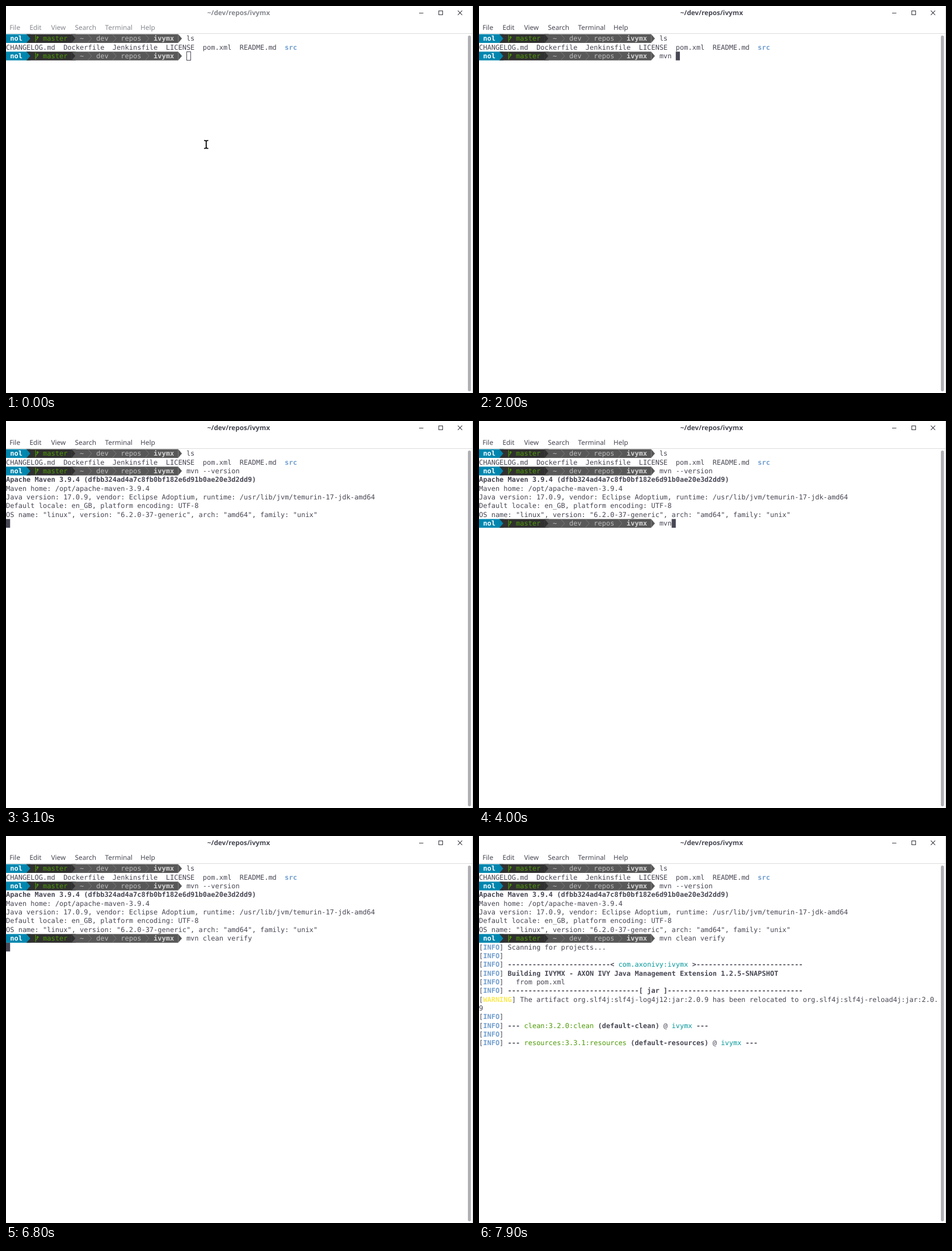
These frames come from a looping animation (823x681 px, 8 s). An HTML page:

```html
<!DOCTYPE html>
<html lang="en">
<head>
<meta charset="utf-8">
<title>Terminal</title>
<style>
  html, body { margin: 0; width: 100%; height: 100%; overflow: hidden; background: #fff; }
  svg { display: block; }
  text { white-space: pre; text-rendering: geometricPrecision; }
  #screen text { font: 12px "DejaVu Sans Mono", monospace; }
  #screen .bold { font-weight: bold; }
  #bar { font: 11.8px "Noto Sans", sans-serif; }
</style>
</head>
<body>
<svg id="stage" width="823" height="681" viewBox="0 0 823 681">
  <g id="bar">
    <text x="410" y="16.3" text-anchor="middle" font-weight="bold">~/dev/repos/ivymx</text>
  </g>
  <g fill="none" stroke="#3c3c46" stroke-width="1.1">
    <path d="M728 12.5h7.5M796.3 8.2l7.6 7.6m0-7.6l-7.6 7.6"/>
    <rect x="762.7" y="8.6" width="6.8" height="6.8"/>
  </g>
  <path d="M0 48.5h823" stroke="#dcdcdc"/>
  <path d="M822.5 0v681" stroke="#d2d2d4"/>
  <rect x="814" y="52" width="5.4" height="626" rx="2.7" fill="#b0b0b4"/>
  <g id="screen"></g>
  <rect id="cursor" stroke-width="1"/>
  <g id="pointer" fill="none" stroke-linecap="round">
    <path d="M349.8 236.6q3 0 3 1.6q0-1.6 3-1.6M352.8 238v11.4M349.8 250.6q3 0 3-1.6q0 1.6 3 1.6" stroke="#000" stroke-width="1.8"/>
  </g>
</svg>
<script>
const LOOP = 8000, CW = 7.2246, RH = 15.36, TOP = 49.6, BASE = 11.7, PROMPT = 44;
const INK = '#474754', BLUE = '#729fcf', GREEN = '#4e9a06', CYAN = '#06989a', YELLOW = '#fce94f';
const $ = id => document.getElementById(id);

function add(parent, tag, attrs, content = '') {
  const el = document.createElementNS('http://www.w3.org/2000/svg', tag);
  for (const k in attrs) el.setAttribute(k, attrs[k]);
  el.textContent = content;
  return parent.appendChild(el);
}

const label = (g, col, str, fill = INK, bold = false) =>
  add(g, 'text', { x: col * CW, y: BASE, fill, class: bold ? 'bold' : '' }, str);

const block = (g, from, to, fill) =>
  add(g, 'rect', { x: from * CW, y: 0, width: (to - from) * CW, height: RH, fill });

const arrow = (g, col, fill) =>
  add(g, 'path', { d: `M${col * CW} 0l6.6 ${RH / 2}l-6.6 ${RH / 2}z`, fill });

function prompt(g) {
  block(g, 0, 6, '#0087af');
  block(g, 5, 17, '#303030');
  block(g, 16, 42, '#585858');
  arrow(g, 5, '#0087af');
  arrow(g, 16, '#303030');
  arrow(g, 42, '#585858');
  for (const col of [20, 26, 34])
    add(g, 'path', { d: `M${col * CW} .6l6.4 ${RH / 2 - .6}l-6.4 ${RH / 2 - .6}`, fill: 'none', stroke: '#858585', 'stroke-width': .8 });
  add(g, 'path', { d: 'M52.2 1.5v12.5M52.4 10.5q3.4-1.4 3.4-5.5m-1.8 1.6l1.8-2.6l1.4 2.6', fill: 'none', stroke: GREEN, 'stroke-width': 1.2 });
  label(g, 1, 'nol', '#fff', true);
  label(g, 9, 'master', GREEN);
  label(g, 18, '~', '#bcbcbc');
  label(g, 22, 'dev', '#bcbcbc');
  label(g, 28, 'repos', '#bcbcbc');
  label(g, 36, 'ivymx', '#d4d4d4', true);
}

// A run is plain text or [text, colour, bold].
const b = str => [str, INK, true];
const info = (...runs) => ['[', ['INFO', BLUE, true], '] ', ...runs];
const goal = (name, id) => info(b('--- '), [name, GREEN], b(` (${id})`), ' @ ', ['ivymx', CYAN], b(' ---'));
const dash = n => '-'.repeat(n);

const lines = [
  { cmd: 'ls' },
  ['CHANGELOG.md  Dockerfile  Jenkinsfile  LICENSE  pom.xml  README.md  ', ['src', BLUE, true]],
  { cmd: 'mvn --version' },
  [b('Apache Maven 3.9.4 (dfbb324ad4a7c8fb0bf182e6d91b0ae20e3d2dd9)')],
  ['Maven home: /opt/apache-maven-3.9.4'],
  ['Java version: 17.0.9, vendor: Eclipse Adoptium, runtime: /usr/lib/jvm/temurin-17-jdk-amd64'],
  ['Default locale: en_GB, platform encoding: UTF-8'],
  ['OS name: "linux", version: "6.2.0-37-generic", arch: "amd64", family: "unix"'],
  { cmd: 'mvn clean verify' },
  info('Scanning for projects...'),
  info(),
  info(b(dash(25) + '< '), ['com.axonivy:ivymx', CYAN], b(' >' + dash(26))),
  info(b('Building IVYMX - AXON IVY Java Management Extension 1.2.5-SNAPSHOT')),
  info('  from pom.xml'),
  info(b(dash(32) + '[ jar ]' + dash(33))),
  ['[', ['WARNING', YELLOW, true], '] The artifact org.slf4j:slf4j-log4j12:jar:2.0.9 has been relocated to org.slf4j:slf4j-reload4j:jar:2.0.'],
  ['9'],
  info(),
  goal('clean:3.2.0:clean', 'default-clean'),
  info(),
  goal('resources:3.3.1:resources', 'default-resources')
];

const rows = lines.map((line, row) => {
  const g = add($('screen'), 'g', { transform: `translate(0 ${TOP + row * RH})` });
  if (line.cmd) {
    prompt(g);
    return { g, cmd: line.cmd, typed: label(g, PROMPT, '') };
  }
  let col = 0;
  for (const run of line) {
    const [str, fill, bold] = [].concat(run);
    label(g, col, str, fill, bold);
    col += str.length;
  }
  return { g };
});

[['File', 6.2], ['Edit', 41.5], ['View', 79.5], ['Search', 121.6], ['Terminal', 174.6], ['Help', 237]]
  .forEach(([name, x]) => add($('bar'), 'text', { x, y: 41.8 }, name));

// Time, cursor row, cursor column, cursor lit. Everything before the cursor is on screen.
const at = (t, row, n) => [t, row, PROMPT + n, 1];
const steps = [
  at(0, 2, 0), [1000, 2, PROMPT, 0],
  at(1400, 2, 1), at(1700, 2, 2), at(1800, 2, 3), at(2000, 2, 4),
  at(2200, 2, 5), at(2300, 2, 6), at(2400, 2, 7), at(2500, 2, 9), at(2700, 2, 13),
  [2800, 3, 0, 1], [3100, 8, 0, 1],
  at(3200, 8, 0), [3500, 8, PROMPT, 0],
  at(3800, 8, 1), at(4000, 8, 3), at(4100, 8, 4), at(4200, 8, 5), at(4300, 8, 7),
  at(4600, 8, 8), at(4700, 8, 9), at(4900, 8, 10),
  at(5100, 8, 12), at(5200, 8, 13), at(5300, 8, 14), at(5400, 8, 15), at(5500, 8, 16),
  [5600, 9, 0, 1], [6200, 9, 0, 0], [6800, 9, 0, 1],
  [7300, 10, 0, 1], [7400, 15, 0, 0], [7800, 19, 0, 0], [7900, 21, 0, 0]
];

const mix = (from, to, k) => `rgb(${from.map((v, i) => Math.round(v + (to[i] - v) * k))})`;
const show = (el, on) => el.setAttribute('visibility', on ? 'visible' : 'hidden');

function render(t) {
  const [, row, col, lit] = steps.findLast(s => s[0] <= t);
  rows.forEach((line, i) => {
    show(line.g, i < row || (i === row && col >= PROMPT));
    if (line.cmd) line.typed.textContent = i < row ? line.cmd : line.cmd.slice(0, Math.max(0, col - PROMPT));
  });

  const focused = t >= 300, inset = focused ? 0 : .5;
  const box = {
    x: (focused ? col * CW : Math.round(col * CW)) + inset,
    y: (focused ? TOP + row * RH : Math.round(TOP + row * RH)) + inset,
    width: focused ? CW : 8 - 2 * inset,
    height: focused ? RH : 16 - 2 * inset,
    fill: focused ? INK : 'none',
    stroke: focused ? 'none' : INK
  };
  for (const k in box) $('cursor').setAttribute(k, box[k]);
  show($('cursor'), lit);
  show($('pointer'), t < 1400);

  // The window gains focus in four short steps.
  const k = Math.min(4, Math.max(0, Math.floor((t - 200) / 100))) / 4;
  $('bar').setAttribute('fill', mix([134, 136, 142], [70, 71, 82], k));
}

const start = performance.now();
function tick() {
  render((performance.now() - start) % LOOP);
  requestAnimationFrame(tick);
}
tick();
</script>
</body>
</html>
```
